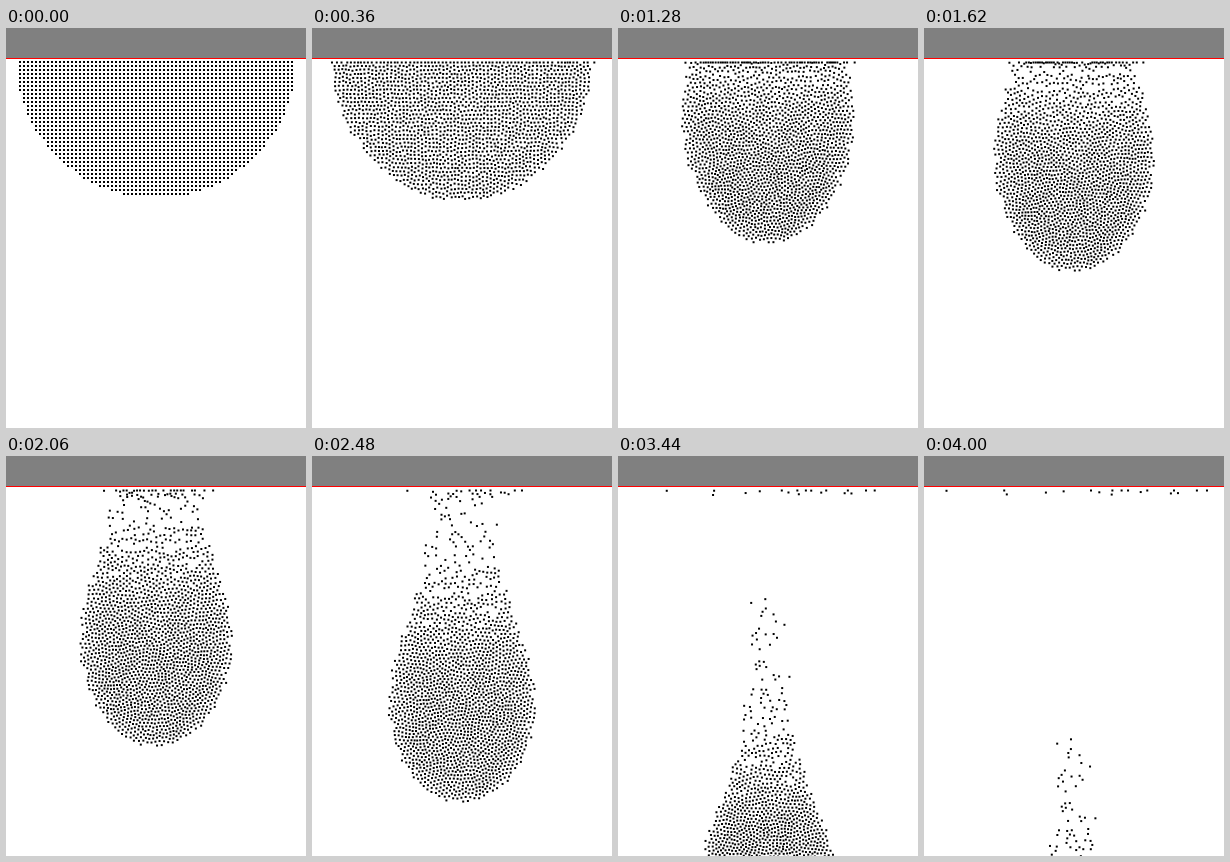
An HTML page with a canvas that plays this animation: 300x400 px, repeating every 4.02 s.

```html
<!DOCTYPE html>
<html>
<head>
<meta charset="utf-8">
<style>
html, body { margin: 0; width: 100%; height: 100%; overflow: hidden; background: #fff; }
canvas { display: block; }
</style>
</head>
<body>
<canvas id="stage" width="300" height="400"></canvas>
<script>
const ctx = document.getElementById('stage').getContext('2d');
const STEP = 20, LOOP = 4020, STEPS = LOOP / STEP;
const CENTER = 150, CEILING = 30, GRID = 4, ROWS = 35;
const GRAVITY = 2.95e-5;

let seed = 7;
function random() {
  seed = (seed * 1664525 + 1013904223) >>> 0;
  return seed / 4294967296;
}
const wobble = () => random() * 7 - 3.5;

// Half disc of dots on a square grid; depth runs from the ceiling (0) to the tip (1).
const dots = [];
for (let j = 1; j < ROWS; j++) {
  const reach = Math.sqrt(ROWS * ROWS - j * j);
  for (let i = 1 - ROWS; i < ROWS; i++) {
    if (Math.abs(i) >= reach) continue;
    const depth = (j - 1 + random()) / (ROWS - 1);
    const x = CENTER + GRID * i, y = CEILING + GRID * j;
    dots.push({
      x, y, tx: x, ty: y, dx: GRID * i, y0: y, depth,
      clings: depth < .009,
      delay: 50 - 160 * Math.log(depth) + 20 / depth + 60 * (i / reach) ** 2,
      wx: wobble(), wy: wobble()
    });
  }
}

// Dots near the ceiling let go later, then catch up with the rest.
function fall(d, t) {
  if (d.clings) return 0;
  const held = d.delay / (1 + (t / 3600) ** 4);
  return GRAVITY * Math.max(0, t - held) ** 2;
}

// The drop contracts, then its upper part thins into a neck;
// dots that cling draw together and spread out again.
function width(d, t) {
  if (d.clings) return 1 - .6 * Math.sin(Math.PI * t / 4400) ** 2;
  const body = 1 - .36 * (1 - Math.exp(-((t / (800 - 200 * d.depth)) ** 2)));
  const neck = Math.min(.42, Math.max(0, (t - 1000) / 5300));
  return body * (1 + .3 * neck) * d.depth ** neck;
}

function follow(t) {
  const loose = Math.min(1, t / 700), PULL = .035;
  for (const d of dots) {
    const tx = CENTER + d.dx * width(d, t) + d.wx * loose;
    const ty = d.y0 + fall(d, t) + d.wy * loose;
    d.x += tx - d.tx + (tx - d.x) * PULL;
    d.y += ty - d.ty + (ty - d.y) * PULL;
    d.tx = tx;
    d.ty = ty;
  }
}

// Neighbours closer than REACH push each other apart.
const REACH = 4.8, CELL = 5, COLS = 64;
function spread() {
  const cells = new Map();
  dots.forEach((d, k) => {
    d.k = k;
    d.px = d.py = 0;
    d.cell = Math.floor(d.x / CELL) + COLS * Math.floor(d.y / CELL);
    if (!cells.has(d.cell)) cells.set(d.cell, []);
    cells.get(d.cell).push(d);
  });
  for (const a of dots) {
    for (let row = -1; row <= 1; row++) for (let col = -1; col <= 1; col++) {
      for (const b of cells.get(a.cell + col + row * COLS) || []) {
        if (b.k <= a.k) continue;
        const x = a.x - b.x, y = a.y - b.y, dist = Math.hypot(x, y) || .01;
        if (dist >= REACH) continue;
        const push = .12 * (REACH - dist) / dist;
        a.px += x * push;
        a.py += y * push;
        b.px -= x * push;
        b.py -= y * push;
      }
    }
  }
  for (const d of dots) {
    d.x += d.px;
    d.y = Math.max(CEILING + 4.5, d.y + d.py);
  }
}

// The whole fall is worked out once, so each picture depends on time alone.
const poses = [];
for (let k = 0; k < STEPS; k++) {
  if (k) {
    follow(k * STEP);
    spread();
  }
  poses.push(dots.map(d => [d.x, d.y]));
}

function draw() {
  const t = performance.now() % LOOP;
  ctx.fillStyle = '#fff';
  ctx.fillRect(0, 0, 300, 400);
  ctx.fillStyle = '#808080';
  ctx.fillRect(0, 0, 300, CEILING);
  ctx.fillStyle = '#f00';
  ctx.fillRect(0, CEILING, 300, 1);
  ctx.fillStyle = '#000';
  for (const [x, y] of poses[Math.floor(t / STEP)]) ctx.fillRect(x - 1, y - 1, 2, 2);
  requestAnimationFrame(draw);
}
draw();
</script>
</body>
</html>
```
